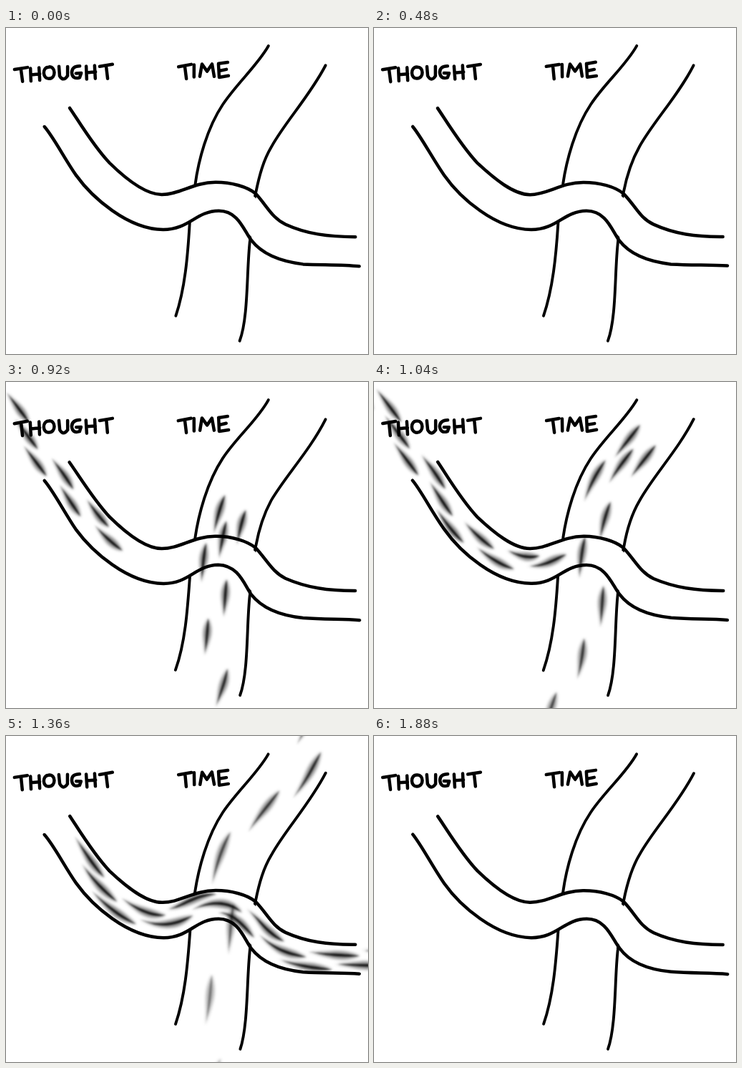
Recreate the animation shown at these times as an HTML page with a canvas. Size 506x456 px, loop 1920 ms.

```html
<!DOCTYPE html>
<html lang="en">
<head>
<meta charset="utf-8">
<title>Thought and time</title>
<style>
html, body { margin: 0; width: 100%; height: 100%; overflow: hidden; background: #fff; }
canvas { display: block; }
</style>
</head>
<body>
<canvas id="stage" width="506" height="456" role="img" aria-label="THOUGHT TIME"></canvas>
<script>
const LOOP = 1920;
const ctx = document.getElementById('stage').getContext('2d');
const NUMBER = /-?\d+(\.\d+)?/g;
const frac = x => x - Math.floor(x);

// Two banks of each stream, with matching segments so they can be averaged.
// lead, span, bunch: where the dashes lie at 1040 ms; phase: lane of the first;
// after rushAt the flow speeds up.
const thought = {
  banks: [
    'M89 112C100 128 122 165 145 189C168 211 195 233 218 233C243 233 262 216 293 216C315 216 337 222 349 232C366 250 372 266 391 275C420 288 450 292 488 292',
    'M54 138C66 152 82 183 98 206C120 237 170 282 220 282C256 282 265 256 297 256C325 256 333 284 343 297C358 317 385 327 415 330C445 332 470 331 494 333'
  ],
  weight: 4.5, half: 24, count: 15, lead: 259, span: 520, bunch: 1,
  phase: 0.5, fade: 0, rushAt: 1200, rush: 0.0022
};
const time = {
  banks: [
    'M237 403C250 365 254 320 257 273C259 250 261 235 264 219C269 185 281 140 303 107C322 78 352 52 367 25',
    'M327 438C339 405 336 340 341 298C343 270 344 250 349 230C354 205 360 185 371 166C390 132 425 95 447 52'
  ],
  weight: 3.9, half: 40, count: 13, lead: 374, span: 820, bunch: 1.8,
  phase: 0.18, fade: 0.65, rushAt: 1560, rush: 0.0025
};

// Hand lettering: advance and strokes, measured from the top left
const glyphs = {
  T: [22, 'M0 2L18 -1M9 1L11 19'],
  H: [19, 'M0 1L1 19M12 0L13 18M1 10L13 9'],
  O: [21, 'M7 0C-3 0 -2 17 7 16C17 16 17 -1 7 0'],
  U: [18, 'M0 0L1 13Q6 22 12 13L12 0'],
  G: [20, 'M11 0Q0 0 0 9Q1 19 11 16L13 10L6 10'],
  I: [8, 'M0 0L0 17'],
  M: [25, 'M0 17L3 0L10 10L17 0L20 17'],
  E: [17, 'M1 0L2 19L15 17M1 0L14 -2M2 10L12 8']
};

for (const stream of [thought, time]) {
  const other = stream.banks[1].match(NUMBER);
  let n = 0;
  stream.centre = stream.banks[0].replace(NUMBER, v => (+v + +other[n++]) / 2);
  const path = document.createElementNS('http://www.w3.org/2000/svg', 'path');
  path.setAttribute('d', stream.centre);
  const end = path.getTotalLength();
  stream.line = Array.from({ length: Math.floor(end) }, (_, s) => {
    const p = path.getPointAtLength(s);
    const a = path.getPointAtLength(Math.max(0, s - 2));
    const b = path.getPointAtLength(Math.min(end, s + 2));
    const d = Math.hypot(b.x - a.x, b.y - a.y);
    return { x: p.x, y: p.y, tx: (b.x - a.x) / d, ty: (b.y - a.y) / d };
  });
}

// Point on the stream, continued straight beyond both ends
function pointAt(line, s, offset) {
  const i = Math.min(line.length - 1, Math.max(0, Math.round(s)));
  const { x, y, tx, ty } = line[i];
  const extra = s - i;
  return { x: x + tx * extra - ty * offset, y: y + ty * extra + tx * offset, nx: -ty, ny: tx };
}

// Brush mark that swells towards its head
function brush(pts, width, blur, alpha) {
  const edge = side => pts.map((p, i) => {
    const w = side * width * Math.sin(Math.PI * (i / (pts.length - 1)) ** 1.5);
    return [p.x + p.nx * w, p.y + p.ny * w];
  });
  ctx.filter = `blur(${blur}px)`;
  ctx.globalAlpha = alpha;
  ctx.beginPath();
  for (const p of [...edge(1), ...edge(-1).reverse()]) ctx.lineTo(...p);
  ctx.fill();
}

function drawDashes({ line, half, count, lead, span, bunch, phase, fade, rushAt, rush }, t) {
  const travel = 0.95 * (t - 1040) + rush * Math.max(0, t - rushAt) ** 2;
  const length = 46 + 0.045 * Math.max(0, t - 760);
  for (let i = 0; i < count; i++) {
    const order = i / (count - 1);
    const head = lead - span * order ** bunch + travel;
    if (head < -200 || head - length > line.length + 100) continue;
    const offset = half * 0.7 * (2 * frac(phase + i * 0.618) - 1);
    const strength = 1 - fade * order ** 3;
    const pts = Array.from({ length: 15 }, (_, k) =>
      pointAt(line, head - length * (1 - k / 14), offset));
    brush(pts, 5.5, 2.2, 0.5 * strength);
    brush(pts, 1.6, 0.8, 0.85 * strength ** 2);
  }
}

function draw(t) {
  let seed = Math.floor(t / 80) * 131;
  const shake = size => (frac(Math.sin(++seed * 12.9898) * 43758.5453) - 0.5) * size;
  const wobble = (d, size) => new Path2D(d.replace(NUMBER, v => ' ' + (+v + shake(size)).toFixed(2)));

  function drawBanks({ banks, weight }) {
    ctx.lineWidth = weight;
    for (const d of banks) ctx.stroke(wobble(d, 0.8));
  }
  function write(word, x, y) {
    ctx.lineWidth = 4.5;
    for (const letter of word) {
      const [advance, d] = glyphs[letter];
      ctx.save();
      ctx.translate(x, y);
      ctx.stroke(wobble(d, 0.5));
      ctx.restore();
      x += advance;
      y -= 0.7;
    }
  }

  ctx.filter = 'none';
  ctx.globalAlpha = 1;
  ctx.fillStyle = '#fff';
  ctx.fillRect(0, 0, 506, 456);
  ctx.fillStyle = ctx.strokeStyle = '#000';
  ctx.lineCap = ctx.lineJoin = 'round';

  drawBanks(time);
  // Thought bridges over time
  ctx.strokeStyle = '#fff';
  ctx.lineWidth = 42;
  ctx.stroke(new Path2D(thought.centre));
  ctx.strokeStyle = '#000';
  drawBanks(thought);

  write('THOUGHT', 12, 56);
  write('TIME', 241, 52);
  drawDashes(thought, t);
  drawDashes(time, t);
}

const start = performance.now();
function tick() {
  const t = (performance.now() - start) % LOOP;
  draw(Math.floor(t / 40) * 40);
  requestAnimationFrame(tick);
}
tick();
</script>
</body>
</html>
```
